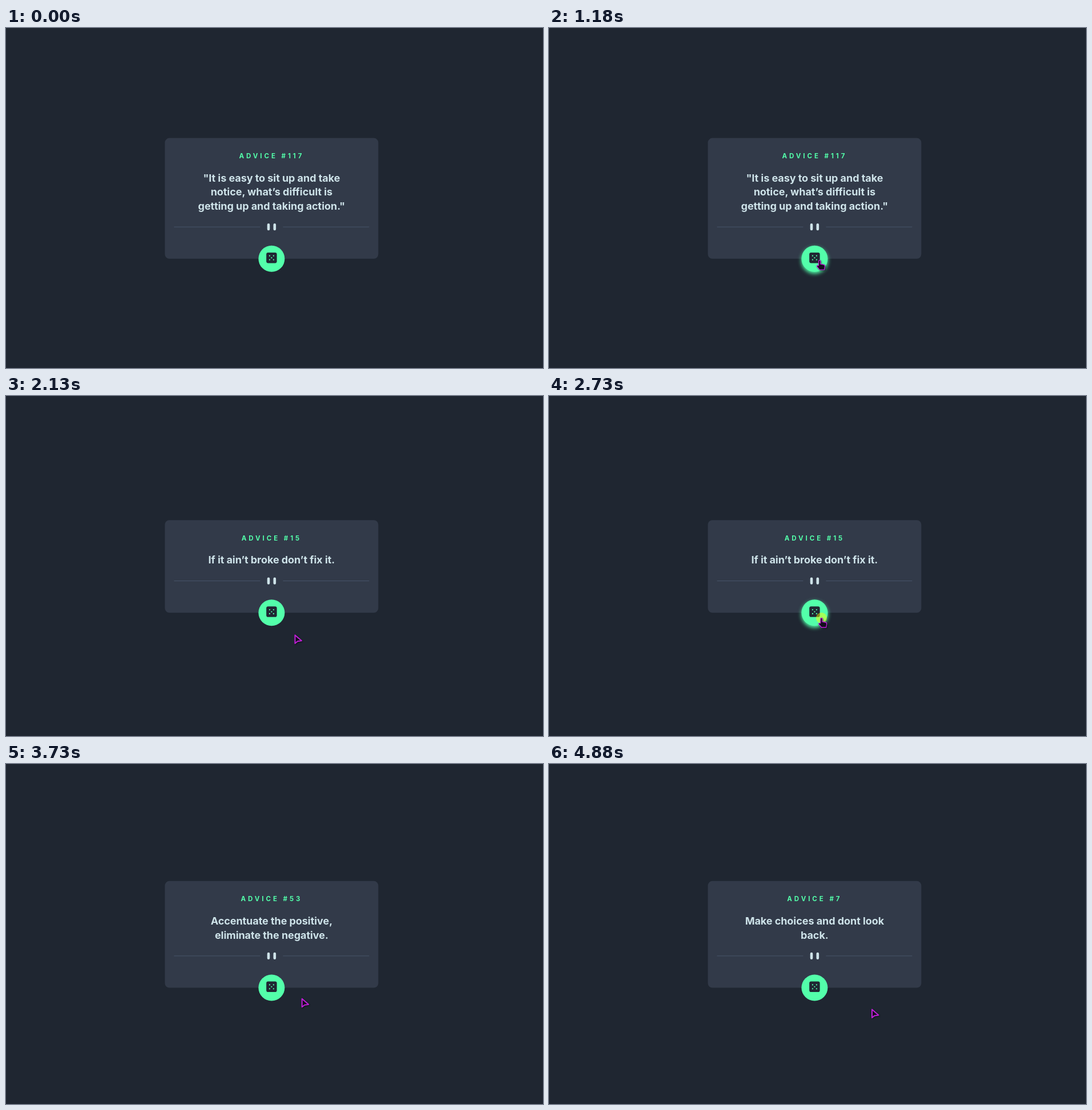
These frames come from a looping animation (941x595 px, 5.53 s). An HTML page:

```html
<!DOCTYPE html>
<html lang="en">
<head>
<meta charset="utf-8">
<title>Advice generator</title>
<style>
  html, body { margin: 0; width: 100%; height: 100%; overflow: hidden; background: #1f2631; }
  svg { display: block; }
  text { font-family: Inter, "Open Sans", sans-serif; font-weight: 700; text-anchor: middle; }
  #title { font-size: 11.5px; letter-spacing: 3.95px; fill: #53ffaa; }
  #quote { font-size: 18px; letter-spacing: -.05px; fill: #cee3e9; }
  #glow { filter: blur(3.6px); }
  #cursor { fill: #150d1e; stroke: #c01fd8; stroke-linejoin: round; filter: drop-shadow(1px 1px 1px #0008); }
</style>
</head>
<body>
<svg width="941" height="595" viewBox="0 0 941 595">
  <rect id="card" x="278.4" width="374" rx="8" fill="#323a49"/>
  <text id="title" x="465.4"></text>
  <g id="quote"></g>
  <!-- footer: the origin is the middle of the card's bottom edge -->
  <g id="footer">
    <g transform="translate(0 -55.7) scale(.77)">
      <path d="M-222 0h196M26 0h196" stroke="#4f5d74"/>
      <path d="M-7 -5v10M7 -5v10" stroke="#cee3e9" stroke-width="6" stroke-linecap="round"/>
    </g>
    <circle id="glow" cy="3" r="23" fill="#53ffaa"/>
    <circle r="23" fill="#53ffaa"/>
    <g transform="translate(0 -1.7) scale(.77)">
      <rect x="-12" y="-12" width="24" height="24" rx="4" fill="#202733"/>
      <path d="M-4.5 -4.5h0M4.5 -4.5h0M0 0h0M-4.5 4.5h0M4.5 4.5h0" stroke="#53ffaa" stroke-width="3" stroke-linecap="round"/>
    </g>
  </g>
  <g id="pointer">
    <circle id="click" r="9.5" fill="#ff0" opacity=".47"/>
    <g id="cursor">
      <path id="arrow" stroke-width="2" d="M.5 .5V15L5 11.4L12 10.4Z"/>
      <path id="hand" stroke-width="1.3" d="M-1.7 9V1.5a1.6 1.6 0 0 1 3.2 0V6.5L7 7.5Q9.2 8 9.2 10.5L8.2 16.5H0L-5 10.5Q-4.5 8 -1.7 9.5"/>
    </g>
  </g>
</svg>
<script>
const LOOP = 5530, CENTER_X = 465.4, CENTER_Y = 298.2, LINE = 24.6, RADIUS = 23;
const ENTRY = [585, 580], SETTLE = 130, CLICK = 75;

const firstCard = {
  id: 117,
  lines: ['"It is easy to sit up and take', 'notice, what’s difficult is', 'getting up and taking action."'],
};

// Each visit: come to the button, click at a spot, leave to a resting place, get a new card.
const visits = [
  { come: 220, click: 770, spot: [465, 401.3], leave: 1110, away: 1540, rest: [521, 433.5],
    swap: 1590, card: { id: 15, lines: ['If it ain’t broke don’t fix it.'] } },
  { come: 1920, click: 2660, spot: [477.5, 388.5], leave: 2880, away: 3450, rest: [554, 418],
    swap: 3060, card: { id: 53, lines: ['Accentuate the positive,', 'eliminate the negative.'] } },
  { come: 3520, click: 4130, spot: [472.5, 400.5], leave: 4270, away: 4880, rest: [565.5, 429],
    swap: 4620, card: { id: 7, lines: ['Make choices and dont look', 'back.'] } },
];

const $ = id => document.getElementById(id);
const show = (id, on) => $(id).style.display = on ? '' : 'none';
const move = (id, x, y) => $(id).setAttribute('transform', `translate(${x} ${y})`);
const progress = (t, from, to) => Math.min(1, Math.max(0, (t - from) / (to - from)));
const mix = (a, b, k) => a.map((v, i) => v + (b[i] - v) * k);

function pointerAt(t) {
  return visits.reduce((pos, v) => {
    const there = mix(pos, v.spot, progress(t, v.come, v.click - SETTLE));
    return mix(there, v.rest, progress(t, v.leave, v.away));
  }, ENTRY);
}

let current;
function layOut(card) {
  if (card === current) return;
  current = card;
  const height = 137.5 + LINE * card.lines.length, top = CENTER_Y - height / 2;
  card.bottom = top + height;
  $('card').setAttribute('y', top);
  $('card').setAttribute('height', height);
  $('title').setAttribute('y', top + 35.5);
  $('title').textContent = 'ADVICE #' + card.id;
  $('quote').innerHTML = card.lines.map((line, i) =>
    `<text x="${CENTER_X}" y="${top + 76.3 + i * LINE}">${line}</text>`).join('');
  move('footer', CENTER_X, card.bottom);
}

function draw(t) {
  const card = visits.findLast(v => v.swap <= t)?.card ?? firstCard;
  layOut(card);

  const [x, y] = pointerAt(t), visible = t >= visits[0].come;
  const hover = visible && Math.hypot(x - CENTER_X, y - card.bottom) < RADIUS;
  move('pointer', x, y);
  show('pointer', visible);
  show('glow', hover);
  show('hand', hover);
  show('arrow', !hover);
  show('click', visits.some(v => t >= v.click && t < v.click + CLICK));
}

const start = performance.now();
function tick() {
  draw((performance.now() - start) % LOOP);
  requestAnimationFrame(tick);
}
tick();
</script>
</body>
</html>
```
